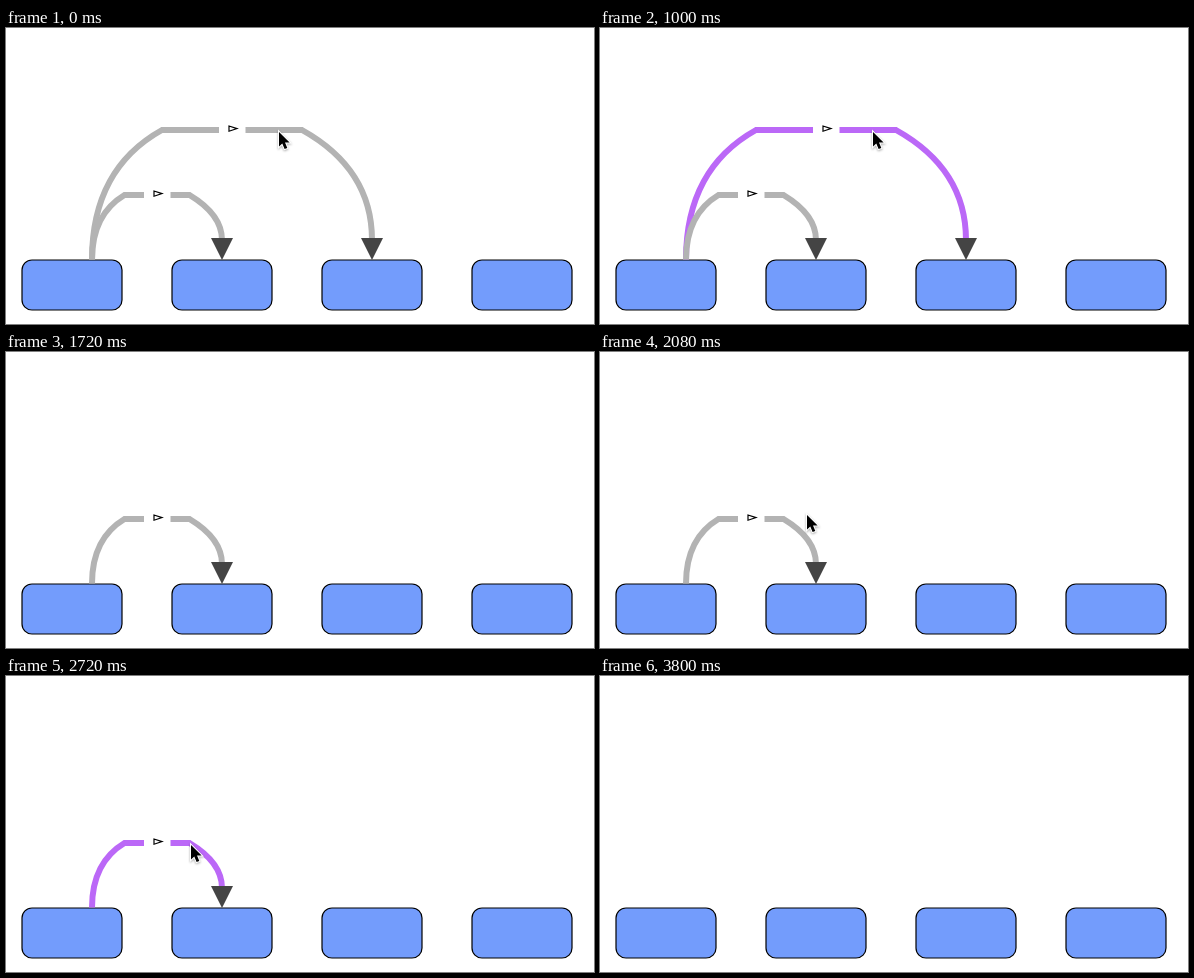
An HTML page for the animation above (4.24 s loop, 588 by 296 pixels).

```html
<!DOCTYPE html>
<html>
<head>
<meta charset="utf-8">
<style>
html, body { margin: 0; width: 100%; height: 100%; overflow: hidden; background: #fff; }
svg { display: block; }
</style>
</head>
<body>
<svg width="588" height="296" viewBox="0 0 588 296">
  <g id="boxes" fill="#739cfc" stroke="#000" stroke-width="1.2"></g>
  <g id="edges"></g>
  <path id="cursor" d="M0 0V14.6L3.3 11.5L5.6 17L8.3 15.9L6 10.6H10.6Z" stroke="#fff" stroke-width="2"
    paint-order="stroke" style="filter:drop-shadow(0 1px 1px #0005)"/>
</svg>
<script>
const LOOP = 4240, STEP = 40, BASE = 232, START = 86;
const $ = id => document.getElementById(id);

$('boxes').innerHTML = [16, 166, 316, 466]
  .map(x => `<rect x="${x}" y="${BASE}" width="100" height="50" rx="10"/>`).join('');

// An edge leaves the first box, bends into a flat top and drops onto the box centred at endX.
function edgeMarkup(endX, height) {
  const top = BASE - height, bend = top + height * 0.3;
  const quarter = (endX - START) / 4, mid = (START + endX) / 2;
  return `<g>
    <path fill="none" stroke-width="6" d="M${START} ${BASE - 0.5}Q${START} ${bend} ${START + quarter} ${top}
      H${endX - quarter}Q${endX} ${bend} ${endX} 212"/>
    <path fill="#444" d="M${endX - 11} 210h22l-11 22z"/>
    <rect x="${mid - 13}" y="${top - 9}" width="26.5" height="18" fill="#fff"/>
    <path fill="#fff" stroke="#000" stroke-width="1.2" d="M${mid - 3} ${top - 4}l8 2.6l-8 2.6z"/>
  </g>`;
}

$('edges').innerHTML = edgeMarkup(366, 130) + edgeMarkup(216, 65);
const [big, small] = $('edges').children;
const edges = [
  { node: big, select: 520, remove: 1720 },
  { node: small, select: 2720, remove: 3320 }
];

// Each visible stretch of the pointer: [time, x, y] keys, hidden from `until`.
const stretches = [
  { until: 1680, keys: [[0, 273, 104]] },
  { until: 3280, keys: [[2000, 227, 146], [2080, 207, 163], [2160, 196, 171],
    [2240, 189, 175], [2360, 185, 174], [2520, 185, 169]] },
  { until: 3800, keys: [[3720, 213, 126], [3760, 310, 10]] }
];

function pointerAt(t) {
  const part = stretches.find(s => t >= s.keys[0][0] && t < s.until);
  if (!part) return null;
  const next = part.keys.findIndex(k => k[0] > t);
  if (next < 0) return part.keys.at(-1).slice(1);
  const a = part.keys[next - 1], b = part.keys[next];
  const f = (t - a[0]) / (b[0] - a[0]);
  return [1, 2].map(i => Math.round(a[i] + (b[i] - a[i]) * f));
}

function draw(now) {
  const t = Math.floor(now % LOOP / STEP) * STEP;
  for (const { node, select, remove } of edges) {
    node.style.display = t < remove ? '' : 'none';
    node.firstElementChild.setAttribute('stroke', t < select ? '#b3b3b3' : '#bb68f7');
  }
  const pos = pointerAt(t);
  $('cursor').style.display = pos ? '' : 'none';
  if (pos) $('cursor').setAttribute('transform', `translate(${pos})`);
}

const origin = performance.now();
function tick() {
  draw(performance.now() - origin);
  requestAnimationFrame(tick);
}
tick();
</script>
</body>
</html>
```
